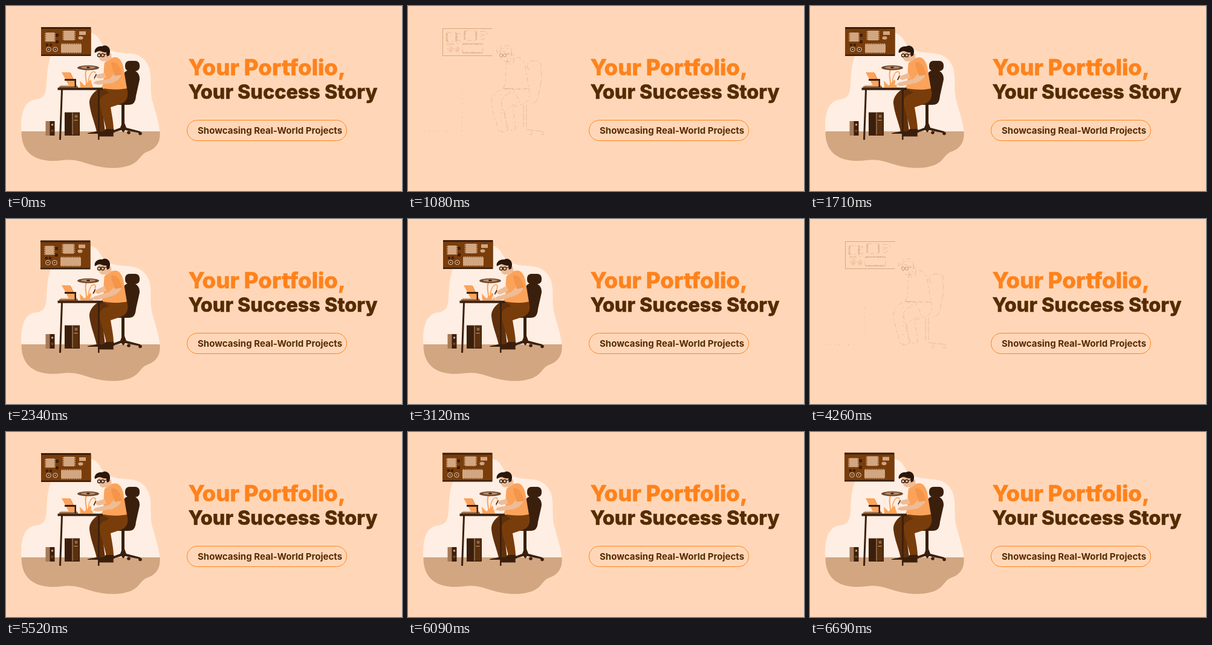
These frames come from a looping animation (655 px wide and 307 px high, 6.72 s). An HTML page with a canvas:

```html
<!DOCTYPE html>
<html lang="en">
<head>
<meta charset="utf-8">
<title>Your Portfolio, Your Success Story</title>
<style>
html, body { margin: 0; width: 100%; height: 100%; overflow: hidden; background: #ffd7b8; }
canvas, svg { position: absolute; left: 0; top: 0; width: 655px; height: 307px; display: block; }
text { font-family: Inter, Roboto, sans-serif; font-weight: 700; fill: #552b03; }
.title { font-weight: 800; stroke: #552b03; stroke-width: .5px; }
.accent { fill: #ff821c; stroke: #ff821c; }
</style>
</head>
<body>
<canvas id="stage"></canvas>
<svg viewBox="0 0 655 307">
  <text class="title accent" x="301.5" y="115" font-size="36.6">Your Portfolio,</text>
  <text class="title" x="301.5" y="154" font-size="32.35">Your Success Story</text>
  <rect x="299.5" y="189.5" width="264" height="34" rx="17" fill="none" stroke="#ff821c"/>
  <text x="317" y="212" font-size="15">Showcasing Real-World Projects</text>
</svg>
<script>
const W = 655, H = 307, STEP = 30, COUNT = 224;
const canvas = document.getElementById('stage');
const ctx = canvas.getContext('2d');
const ratio = window.devicePixelRatio || 1;
canvas.width = W * ratio;
canvas.height = H * ratio;

const DARK = '#3b1f0d', BROWN = '#793d0b', TAN = '#d2a681', ORANGE = '#fba35a',
      SKIN = '#eebc96', CREAM = '#ffeee3', HAIR = '#2b160b';
const PENCIL = 'rgba(155,88,38,.36)', FIRM = 'rgba(140,75,30,.6)';
let sketch = false;

const mod = (a, b) => ((a % b) + b) % b;

function trace(path, color, dash) {
  ctx.strokeStyle = color;
  ctx.lineWidth = 0.6;
  ctx.setLineDash(dash);
  ctx.stroke(path);
}

// Filled normally, or only outlined in the sketch state
function paint(color, path) {
  if (sketch) {
    trace(path, PENCIL, [7, 2, 1, 3, 3, 4]);
  } else {
    ctx.fillStyle = color;
    ctx.fill(path);
  }
}
const shape = (color, d) => paint(color, new Path2D(d));

function box(color, x, y, w, h, r = 0) {
  const p = new Path2D();
  p.roundRect(x, y, w, h, r);
  paint(color, p);
}

function oval(color, x, y, rx, ry = rx) {
  const p = new Path2D();
  p.ellipse(x, y, rx, ry, 0, 0, Math.PI * 2);
  paint(color, p);
}

function line(color, width, d) {
  const p = new Path2D(d);
  if (sketch) return trace(p, PENCIL, [4, 3, 1, 3]);
  ctx.strokeStyle = color;
  ctx.lineWidth = width;
  ctx.setLineDash([]);
  ctx.stroke(p);
}

function chip(x, y, w, h, upright) {
  const p = new Path2D();
  p.rect(x, y, w, h);
  const len = upright ? w : h;
  for (let k = 1; k < len - 1; k += 3) {
    if (upright) {
      p.rect(x + k, y - 1.5, 1.5, 1.5);
      p.rect(x + k, y + h, 1.5, 1.5);
    } else {
      p.rect(x - 2, y + k, 2, 1.5);
      p.rect(x + w, y + k, 2, 1.5);
    }
  }
  paint(TAN, p);
}

function room() {
  shape(CREAM, `M25.5 209C24 185 27 157 50 155C64 153 66 145 67 130C68 112 69 96 74 83
    C82 60 100 44 128 43C143 43 151 48 156 58C164 74 181 77 199 78C219 79 231 86 237 103
    C242 121 237 139 242 157C247 176 253 192 254.5 209Z`);
  shape(TAN, `M25.5 208H254.5C256 225 249 237 233 242C222 247 221 257 208 263
    C190 271 164 270 143 264C126 259 113 253 93 256C63 260 25 254 25.5 208Z`);
}

function board(dx, dy) {
  ctx.save();
  ctx.translate(dx, dy);
  if (sketch) {
    trace(new Path2D('M140.5 37.5H58.5V82.5H140.5'), FIRM, []);
  } else {
    box(DARK, 58, 35, 82.5, 48);
    box(BROWN, 58, 38, 82.5, 42.5);
  }
  chip(66, 44, 14, 15, false);
  chip(95.5, 41, 17.5, 16, false);
  chip(91, 63.5, 34, 13.5, true);
  box(TAN, 121, 42, 11, 6);
  oval(TAN, 123.5, 53, 4, 2.8);
  box(DARK, 82, 46, 5, 5);
  box(DARK, 82, 57, 5, 5);
  box(DARK, 66, 62.5, 4, 4);
  box(DARK, 72, 62.5, 4, 4);
  for (const x of [70.5, 81.5]) {
    oval(TAN, x, 72, 4.3);
    oval(DARK, x, 72, 2.8);
    oval(TAN, x, 72, 1.3);
  }
  ctx.restore();
}

function chair() {
  box(DARK, 197, 91, 24, 17, 7);
  shape(DARK, `M201 107C211 104 222 109 221 122L215 149C214 160 211 164 202 164H172
    C167 162 169 152 174 151H190L193 119C194 111 197 109 201 107Z`);
  box(DARK, 191, 163, 5, 38);
  shape(DARK, 'M192 194H196L199 202L222 208V211L197 206L194 210L191 206L173 211V208L189 202Z');
  for (const [x, y] of [[203, 210], [222, 211.5], [175, 211.5]]) oval(DARK, x, y, 2.8);
}

// What is left of the chair, floor and desk while only outlines show
function traces() {
  const back = `M200 106C194 98 198 91 209 91C220 91 222 97 219 106
    C223 112 220 128 217 140C215 154 214 161 202 163`;
  trace(new Path2D(back), PENCIL, [9, 2, 2, 3]);
  trace(new Path2D('M191 164V201M196 164V201M196 205L222 208'), PENCIL, [12, 2]);
  for (const x of [203, 222]) oval(DARK, x, 211, 2.8);
  trace(new Path2D('M27 208H74M90 140L89 222M154 140V222'), PENCIL, [1, 5, 2, 7]);
}

function computers() {
  box('#a77a56', 65.5, 191, 8, 24);
  box(DARK, 72.5, 191, 8, 24);
  oval(TAN, 76.5, 197, 1.7);
  oval(BROWN, 76.5, 207, 2.3);
  box(DARK, 97, 176.5, 25, 38.5);
  box('#5a300f', 111, 178, 9.5, 35.5);
  box(TAN, 109.5, 177, 1, 37);
  oval(TAN, 116, 183, 2);
  oval(DARK, 116, 183, 1);
  box(TAN, 112.5, 189, 6, 1);
}

function legs() {
  shape('#60300b', `M172 137H154C143 144 137 153 138 162C140 179 147 194 150 209H164
    L160 176C163 168 179 163 185 158Z`);
  shape(BROWN, `M159 137H200C204 151 199 160 188 163L173 168C175 181 178 194 178 206H166
    C163 190 157 176 155 162C154 151 160 148 171 144Z`);
}

function shoes() {
  shape(DARK, 'M165 204H178L180 210H161C160 207 163 207 165 204Z');
  shape(DARK, 'M151 208H164L177 211L178 216.5H154Z');
  shape(DARK, 'M149 208H160V212H135C134 210 142 210 149 208Z');
}

function desk() {
  shape(DARK, 'M91 139H94L91 222H88Z');
  shape(DARK, 'M152 139H155L154.5 222H152Z');
  box(DARK, 85.5, 135.5, 74.5, 4);
  box(TAN, 90, 131.5, 28, 2);
  box(BROWN, 88, 133.5, 31, 2);
  shape(ORANGE, 'M92 110H105L115 132H104Z');
  shape('#f28a38', 'M105 110L107 111L117 132H115Z');
  shape(DARK, 'M97 121H116V135H113.5V124H97Z');
  shape(ORANGE, 'M122 124L130 132L140 122L144 135H123Z');
}

function person(sway) {
  ctx.save();
  ctx.translate(0, -0.25 * sway);
  // neck and shirt
  shape(SKIN, 'M162 80L174 79L175 94L166 97Z');
  shape(ORANGE, `M163 94C171 92 173 87 176 86C185 83 191 89 194 101L200 137
    C184 140 170 139 158 136C164 124 160 111 163 94Z`);
  // head
  shape(SKIN, 'M152 74C153 69 168 67 171 76C173 84 168 92 161 92C156 92 154 88 153 83Z');
  shape(HAIR, `M147 78C145 72 151 66 159 67C166 63 173 69 172 77L171 82
    L167 84L166 77C160 78 157 74 153 75Z`);
  for (const x of [154, 160]) {
    const p = new Path2D();
    p.arc(x, 82, 2.6, 0, Math.PI * 2);
    ctx.setLineDash([]);
    ctx.strokeStyle = sketch ? FIRM : HAIR;
    ctx.lineWidth = sketch ? 0.7 : 1.3;
    ctx.stroke(p);
  }
  line(HAIR, 1, 'M162.5 81L169 79');
  ctx.restore();
}

function arms(sway) {
  const y = -2.5 * sway, x = 1.2 * sway;
  shape(SKIN, `M163 111L166 119L${153 + x} ${123 + y}L${147 + x} ${120 + y}L${150 + x} ${116 + y}Z`);
  shape(SKIN, `M181 110L191 113C190 120 183 125 175 128L${151 + x} ${133 + y}
    L${143 + x} ${131 + y}L${147 + x} ${127 + y}L171 121Z`);
  shape('#f49549', 'M174 94C181 92 187 97 190 107L192 114L180 116C178 107 174 102 174 94Z');
  line(CREAM, 2.2, `M${147 + x} ${115 + y}L${141 + x} ${130 + y}`);
  line(DARK, 1.6, `M${148 + x} ${116 + y}L${145 + x} ${122 + y}`);
}

function lamp() {
  line(ORANGE, 2, 'M133 132C134 122 129 115 133 106');
  line(ORANGE, 1.6, 'M137 130C135 121 140 108 146 109C151 111 145 117 146 122');
  oval('#6e4a31', 136, 102.5, 18, 4);
  oval('#b98c69', 136, 102, 12, 2);
  oval(DARK, 136, 102, 3, 1.2);
}

function draw(ms) {
  const n = Math.floor(ms / STEP) % COUNT;
  const sway = Math.cos(n / COUNT * Math.PI * 2);
  const beat = n % 5;
  sketch = mod(n - 36, 13.25) < 1;

  ctx.setTransform(ratio, 0, 0, ratio, 0, 0);
  ctx.fillStyle = '#ffd7b8';
  ctx.fillRect(0, 0, W, H);
  ctx.lineCap = sketch ? 'butt' : 'round';

  if (!sketch) room();
  board(beat % 2 ? -1 : 0, beat === 3 ? -0.7 * sway : 0);
  if (sketch) {
    traces();
    legs();
    person(sway);
    return;
  }
  chair();
  computers();
  legs();
  shoes();
  person(sway);
  desk();
  lamp();
  arms(sway);
}

const start = performance.now();
function tick() {
  draw(performance.now() - start);
  requestAnimationFrame(tick);
}
tick();
</script>
</body>
</html>
```
